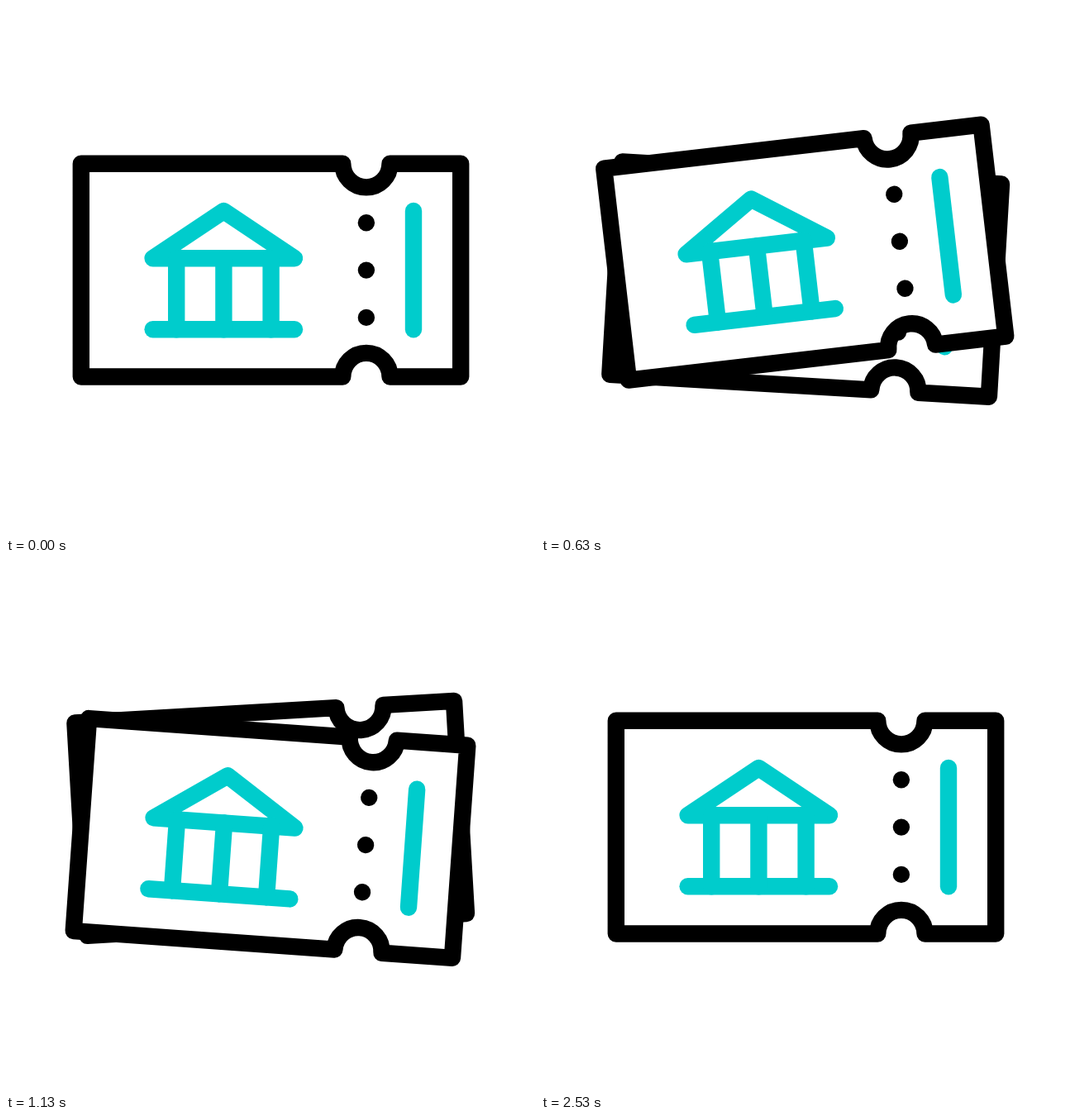
Recreate the animation shown at these times as an HTML page with a canvas. Size 640 by 640 pixels, loop 2.83 s.

```html
<!DOCTYPE html>
<html lang="en">
<head>
<meta charset="utf-8">
<title>Museum tickets</title>
<style>
  html, body { margin: 0; width: 100%; height: 100%; overflow: hidden; background: #fff; }
  canvas { display: block; width: 640px; height: 640px; }
</style>
</head>
<body>
<canvas id="stage" width="640" height="640"></canvas>
<script>
const ctx = document.getElementById('stage').getContext('2d');
const LOOP = 2830;
const TEAL = '#00cccc', GLOW = '#33cccc';
const BOX = { l: 90.8, r: 550.2, t: 190.8, b: 448.5 };
const NOTCH = { x: 435.9, r: 28.6 };
const DOTS = [262.2, 319.6, 376.9];
const BAR = { x: 493, top: 248, bottom: 391.3 };
const PIVOT = { x: 134, y: 319.65 };

// Keys are [frame, value], at 30 frames per second.
const SWING = [13.1, 22.9, 28.8, 41];
const swingKeys = values => [[0, 0], ...SWING.map((f, i) => [f, values[i]])];
const FRONT = swingKeys([9, -15, 6.7, 0]);
const BACK = swingKeys([-9, 10, -5.45, 0]);
const GLOWS = [
  [[53, 0], [56, 1], [57, 1], [60, 0]],
  [[47, 0], [49, 1], [53, 1], [56, 0]],
  [[45, 0], [47, 1], [49, 0]]
];
const BAR_KEYS = [[53, 1], [64, 0], [76, 1]];

const linear = s => s;
const smooth = s => s * s * (3 - 2 * s);

function track(keys, frame, ease) {
  if (frame <= keys[0][0]) return keys[0][1];
  for (let i = 1; i < keys.length; i++) {
    const [f0, v0] = keys[i - 1], [f1, v1] = keys[i];
    if (frame < f1) return v0 + (v1 - v0) * ease((frame - f0) / (f1 - f0));
  }
  return keys[keys.length - 1][1];
}

function line(...pts) {
  ctx.beginPath();
  for (let i = 0; i < pts.length; i += 2) ctx.lineTo(pts[i], pts[i + 1]);
  ctx.stroke();
}

function dot(y, color, alpha = 1) {
  ctx.globalAlpha = alpha;
  ctx.fillStyle = color;
  ctx.beginPath();
  ctx.arc(NOTCH.x, y, 10.2, 0, Math.PI * 2);
  ctx.fill();
  ctx.globalAlpha = 1;
}

function outline() {
  ctx.beginPath();
  ctx.moveTo(BOX.l, BOX.t);
  ctx.arc(NOTCH.x, BOX.t, NOTCH.r, Math.PI, 0, true);
  ctx.lineTo(BOX.r, BOX.t);
  ctx.lineTo(BOX.r, BOX.b);
  ctx.arc(NOTCH.x, BOX.b, NOTCH.r, 0, Math.PI, true);
  ctx.lineTo(BOX.l, BOX.b);
  ctx.closePath();
  ctx.fillStyle = '#fff';
  ctx.fill();
  ctx.strokeStyle = '#000';
  ctx.stroke();
}

function museum() {
  const l = 177.6, r = 349, mid = 263.4, eave = 305.2, base = 391.3;
  ctx.beginPath();
  ctx.moveTo(l, eave);
  ctx.lineTo(mid, 248);
  ctx.lineTo(r, eave);
  ctx.closePath();
  ctx.stroke();
  line(l, base, r, base);
  for (const dx of [-57.2, 0, 57.2]) line(mid + dx, eave, mid + dx, base);
}

function ticket(angle, frame) {
  ctx.save();
  ctx.translate(PIVOT.x, PIVOT.y);
  ctx.rotate(angle * Math.PI / 180);
  ctx.translate(-PIVOT.x, -PIVOT.y);
  ctx.lineWidth = 20.4;
  ctx.lineCap = ctx.lineJoin = 'round';
  outline();
  ctx.strokeStyle = TEAL;
  museum();
  const grown = track(BAR_KEYS, frame, linear);
  if (grown > 0) line(BAR.x, BAR.top, BAR.x, BAR.top + (BAR.bottom - BAR.top) * grown);
  DOTS.forEach((y, i) => {
    dot(y, '#000');
    const glow = track(GLOWS[i], frame, linear);
    if (glow > 0) dot(y, GLOW, glow);
  });
  ctx.restore();
}

function draw(time) {
  const frame = Math.floor(0.3 * (Math.floor(time / 10) + 0.5));
  ctx.fillStyle = '#fff';
  ctx.fillRect(0, 0, 640, 640);
  const back = track(BACK, frame, smooth);
  if (back) ticket(back, frame);
  ticket(track(FRONT, frame, smooth), frame);
}

const start = performance.now();
function tick() {
  draw((performance.now() - start) % LOOP);
  requestAnimationFrame(tick);
}
tick();
</script>
</body>
</html>
```
